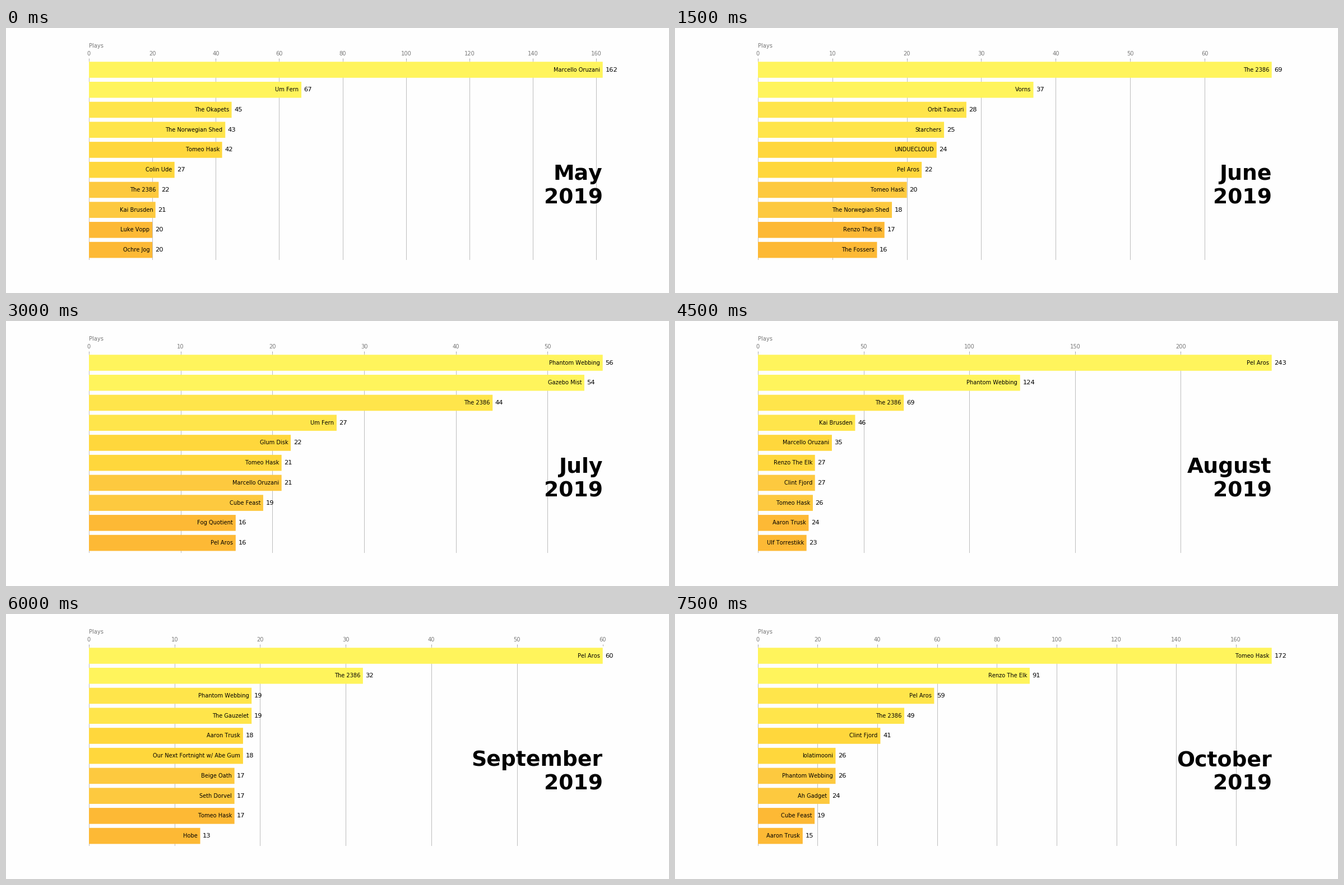
Write a matplotlib script that moves like this. It is 1183x473 px and loops after 8000 ms.

```python
import matplotlib.pyplot as plt
from matplotlib.animation import FuncAnimation
from matplotlib.ticker import MaxNLocator

WIDTH, HEIGHT = 1183, 473
DPI = WIDTH / 20
STEP_MS, FRAMES, FRAMES_PER_MONTH = 500, 16, 3
GREY = "#777777"
PALETTE = ["#fff45c", "#ffe54b", "#ffd73c", "#fdc93f", "#fdb935"]

# Each chart: month, then "artist:plays" from most to least played.
CHARTS = [
    ("May", "Marcello Oruzani:162, Um Fern:67, The Okapets:45, "
            "The Norwegian Shed:43, Tomeo Hask:42, Colin Ude:27, The 2386:22, "
            "Kai Brusden:21, Luke Vopp:20, Ochre Jog:20"),
    ("June", "The 2386:69, Vorns:37, Orbit Tanzuri:28, Starchers:25, "
             "UNDUECLOUD:24, Pel Aros:22, Tomeo Hask:20, "
             "The Norwegian Shed:18, Renzo The Elk:17, The Fossers:16"),
    ("July", "Phantom Webbing:56, Gazebo Mist:54, The 2386:44, Um Fern:27, "
             "Glum Disk:22, Tomeo Hask:21, Marcello Oruzani:21, "
             "Cube Feast:19, Fog Quotient:16, Pel Aros:16"),
    ("August", "Pel Aros:243, Phantom Webbing:124, The 2386:69, "
               "Kai Brusden:46, Marcello Oruzani:35, Renzo The Elk:27, "
               "Clint Fjord:27, Tomeo Hask:26, Aaron Trusk:24, "
               "Ulf Torrestikk:23"),
    ("September", "Pel Aros:60, The 2386:32, Phantom Webbing:19, "
                  "The Gauzelet:19, Aaron Trusk:18, "
                  "Our Next Fortnight w/ Abe Gum:18, Beige Oath:17, "
                  "Seth Dorvel:17, Tomeo Hask:17, Hobe:13"),
    ("October", "Tomeo Hask:172, Renzo The Elk:91, Pel Aros:59, The 2386:49, "
                "Clint Fjord:41, lolatimooni:26, Phantom Webbing:26, "
                "Ah Gadget:24, Cube Feast:19, Aaron Trusk:15"),
]

plt.rcParams.update({"font.family": "DejaVu Sans", "text.kerning_factor": 6})
fig = plt.figure(figsize=(WIDTH / DPI, HEIGHT / DPI), dpi=DPI,
                 facecolor="#fefefe")
ax = fig.add_axes([0.125, 0.125, 0.775, 0.755])


def parse(chart):
    rows = [entry.rsplit(":", 1) for entry in chart.split(", ")]
    return [(name, int(plays)) for name, plays in rows]


def style_axes(top):
    ax.set_frame_on(False)
    ax.set_axisbelow(True)
    ax.set_xlim(0, top)
    ax.set_ylim(9.498, -0.498)
    ax.set_yticks([])
    ax.xaxis.set_major_locator(MaxNLocator(9, steps=[1, 2, 5, 10]))
    ax.xaxis.set_ticks_position("top")
    ax.tick_params(axis="x", colors=GREY, labelsize=12)
    ax.grid(axis="x", linestyle="-", color="#b0b0b0", linewidth=1)


def draw(frame):
    month, chart = CHARTS[frame // FRAMES_PER_MONTH]
    rows = parse(chart)
    top = rows[0][1]
    gap = top / 200

    ax.clear()
    style_axes(top)
    for rank, (name, plays) in enumerate(rows):
        ax.barh(rank, plays, height=0.8, color=PALETTE[rank // 2], snap=False)
        ax.text(plays - gap, rank, name, size=12, ha="right", va="center")
        ax.text(plays + gap, rank, str(plays), size=14, ha="left", va="center")
    ax.text(0, 1.06, "Plays", transform=ax.transAxes, size=12, color=GREY)
    ax.text(1, 0.28, f"{month}\n2019", transform=ax.transAxes, size=46,
            weight="bold", ha="right", va="baseline", linespacing=1.23)
    return []


animation = FuncAnimation(fig, draw, frames=FRAMES, init_func=lambda: draw(0),
                          interval=STEP_MS, repeat=True, repeat_delay=0)
plt.show()
```
